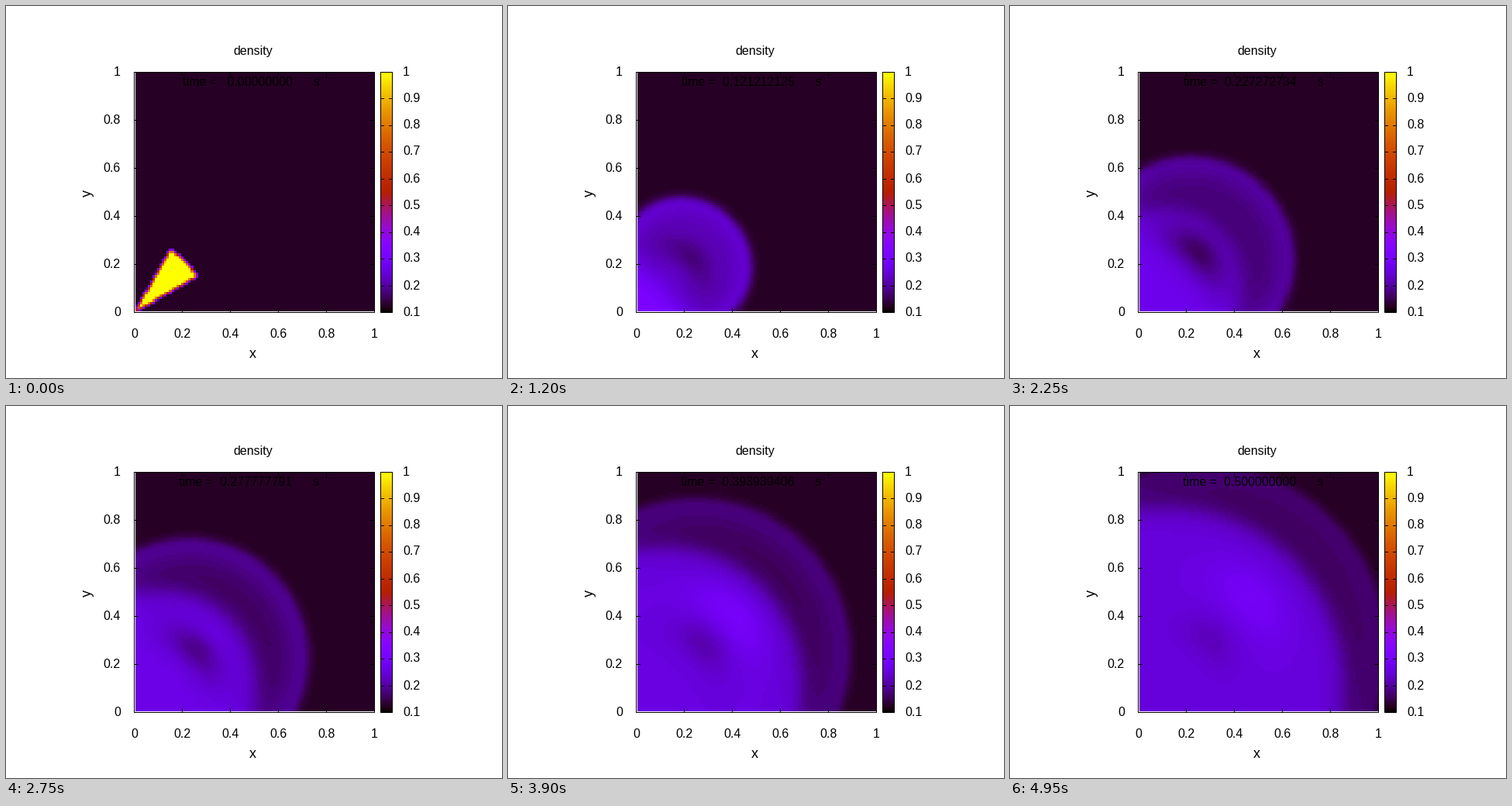
These frames come from a looping animation (640x480 px, 5 s). A matplotlib script:

```python
import numpy as np
import matplotlib.pyplot as plt
from matplotlib.animation import FuncAnimation
from matplotlib.colors import ListedColormap
from matplotlib.patches import Rectangle

W, H, DPI = 640, 480, 100
PX = 72 / DPI
FRAMES, INTERVAL, T_END = 100, 50, 0.5
LEFT, TOP, SIDE = 165.5, 85.5, 310
RIGHT, BOTTOM = LEFT + SIDE, TOP + SIDE
BAR_LEFT, BAR_RIGHT = 483.5, 498.5
LOW, HIGH = 0.1, 1.0

CELL = 0.01
AMBIENT = 0.125
WEDGE_RADIUS, HALF_ANGLE = 0.3, np.radians(15)

plt.rcParams["font.family"] = "Liberation Sans"


def palette(levels=128):
    v = np.linspace(0, 1, levels)
    blue = np.clip(np.sin(2 * np.pi * v), 0, 1)
    return ListedColormap(np.column_stack((np.sqrt(v), v**3, blue)))


# --- density of a bursting wedge of gas ---

nodes = (np.arange(101) + 0.5) * CELL
X, Y = np.meshgrid(nodes, nodes)
RADIUS = np.hypot(X, Y)
ALONG = (X + Y) / np.sqrt(2)      # along the diagonal
ACROSS = (X - Y) / np.sqrt(2)     # across it
TURN = np.arctan2(ACROSS, ALONG)  # angle from it


def outside_distance():
    over = np.abs(TURN) - HALF_ANGLE
    reach = RADIUS * np.cos(over)
    side = np.hypot(reach - np.clip(reach, 0, WEDGE_RADIUS),
                    RADIUS * np.sin(over))
    return np.where(over < 0, np.maximum(RADIUS - WEDGE_RADIUS, 0), side)


GAP = outside_distance()
EDGES = np.stack((RADIUS * np.sin(HALF_ANGLE - TURN),
                  RADIUS * np.sin(HALF_ANGLE + TURN),
                  WEDGE_RADIUS - RADIUS))


def ease(v, start, end):
    u = np.clip((v - start) / (end - start), 0, 1)
    return u * u * (3 - 2 * u)


def step(depth, width):
    return 0.5 * (1 + np.tanh(depth / width))


def arc(radius, thick, wide):
    """Soft crescent across the diagonal, bent around the corner."""
    return np.exp(-((RADIUS - radius) / thick)**2 - (ACROSS / wide)**2)


def blast(t):
    """Outer wave: grows from the wedge outline into a circle."""
    centre = 0.18 + 0.17 * t
    circle = 0.09 + 1.6 * t - 0.5 * t * t - np.hypot(X - centre, Y - centre)
    outline = 1.85 * t - GAP
    round_share = ease(t, 0, 0.17)
    depth = outline + round_share * (circle - outline)
    width = 0.001 + 0.019 * (1 - np.exp(-t / 0.03))
    crest = 0.026 / (t + 0.09)
    wake = 0.02 + 0.11 * np.exp(-(t / 0.19)**2)
    fall = np.exp(-(np.maximum(depth, 0) / (0.03 + 0.25 * t))**2)
    return step(depth, width), wake + (crest - wake) * fall


def core(t):
    """Share of the dense gas left in the wedge."""
    soft = 0.3 * t + 1e-4
    depth = -soft * np.logaddexp.reduce(-EDGES / soft, axis=0)
    ramp = np.clip((depth + 0.93 * t) / (2.1 * t + 1e-3), 0, 1)
    return ramp**2 / (1 + (t / 0.06)**4)


def density(t):
    inside, shell = blast(t)

    # Second wave, filled from the corner
    ball = step(1.53 * t - 0.035 - np.hypot(X - 0.12, Y - 0.12),
                0.025 + 0.06 * t) * ease(t, 0.1, 0.22)
    fill = 0.13 - 0.17 * np.exp(-t / 0.152)
    gas = shell + ball * (fill - shell)

    corner = 0.115 * np.exp(-(t / 0.27)**2) * (1 - np.exp(-t / 0.03))
    gas += corner * step(1.2 * t - ALONG, 0.02 + 0.3 * t)

    hole = 0.13 * np.exp(-2.8 * t) * ease(t, 0.08, 0.16)
    gas -= hole * arc(0.29 + 0.27 * t, 0.055 + 0.06 * t, 0.13)

    ridge = 0.055 * ease(t, 0.2, 0.36) * (1 - 0.5 * ease(t, 0.4, 0.6))
    gas += ridge * arc(0.21 + 0.92 * t, 0.02 + 0.18 * t, 0.2)

    rho = AMBIENT + inside * gas
    rho += (1 - rho) * core(t)
    return (rho[1:, 1:] + rho[:-1, 1:] + rho[1:, :-1] + rho[:-1, :-1]) / 4


def moment(i):
    return T_END * i / (FRAMES - 1)


def time_label(i):
    t = float(np.float32(moment(i)))
    if i == 0:
        value = "   0.00000000    "
    elif t < 0.1:
        value = f"   {t:.8E}"
    else:
        value = f"  {t:.9f}    "
    return f"time ={value}  s"


# --- stage ---

fig = plt.figure(figsize=(W / DPI, H / DPI), dpi=DPI, facecolor="white")
ax = fig.add_axes([0, 0, 1, 1])
ax.axis("off")


def line(xs, ys):
    ax.plot(xs, ys, color="black", lw=PX, zorder=3, snap=False,
            solid_capstyle="projecting", solid_joinstyle="miter")


def box(x0, y0, x1, y1):
    line([x0, x1, x1, x0, x0], [y0, y0, y1, y1, y0])


def label(x, y, s, ha="center", size=16, **kw):
    kw.setdefault("va", "baseline")
    return ax.text(x, y, s, ha=ha, fontsize=size * PX, color="black",
                   zorder=4, **kw)


def picture(data, extent):
    return ax.imshow(data, cmap=colors, vmin=LOW, vmax=HIGH, origin="lower",
                     extent=extent, aspect="auto", interpolation="nearest",
                     zorder=1)


colors = palette()
inset = nodes[0] * SIDE
field = picture(density(0), (LEFT + inset, RIGHT + inset,
                             BOTTOM - inset, TOP - inset))
field.set_clip_path(Rectangle((LEFT, TOP), SIDE, SIDE,
                              transform=ax.transData))
picture(np.linspace(LOW, HIGH, 128)[:, None],
        (BAR_LEFT, BAR_RIGHT, BOTTOM, TOP))

box(LEFT, TOP, RIGHT, BOTTOM)
box(BAR_LEFT, TOP, BAR_RIGHT, BOTTOM)

for k in range(6):
    shift = k * SIDE / 5
    x, y = LEFT + shift, BOTTOM - shift
    if 0 < k < 5:
        line([x, x], [BOTTOM, BOTTOM - 5])
        line([x, x], [TOP, TOP + 5])
        line([LEFT, LEFT + 5], [y, y])
        line([RIGHT, RIGHT - 5], [y, y])
    label(x, 427.5, f"{k / 5:g}")
    label(148, y + 4, f"{k / 5:g}", ha="right")

for k in range(10):
    y = np.floor(BOTTOM - k * SIDE / 9) + 0.5
    if 0 < k < 9:
        line([BAR_LEFT, BAR_LEFT + 4], [y, y])
        line([BAR_RIGHT, BAR_RIGHT - 4], [y, y])
    label(512, y + 4, f"{(k + 1) / 10:g}", ha="left")

label(318.5, 62.5, "density")
label(318, 454, "x", size=18)
label(105.5, 242, "y", size=18, rotation=90, va="center")
clock = label(404.5, 103, time_label(0), ha="right")

ax.set_xlim(0, W)
ax.set_ylim(H, 0)


def update(i):
    field.set_data(density(moment(i)))
    clock.set_text(time_label(i))
    return field, clock


anim = FuncAnimation(fig, update, frames=FRAMES, interval=INTERVAL,
                     repeat=True, repeat_delay=0, blit=False)
plt.show()
```
